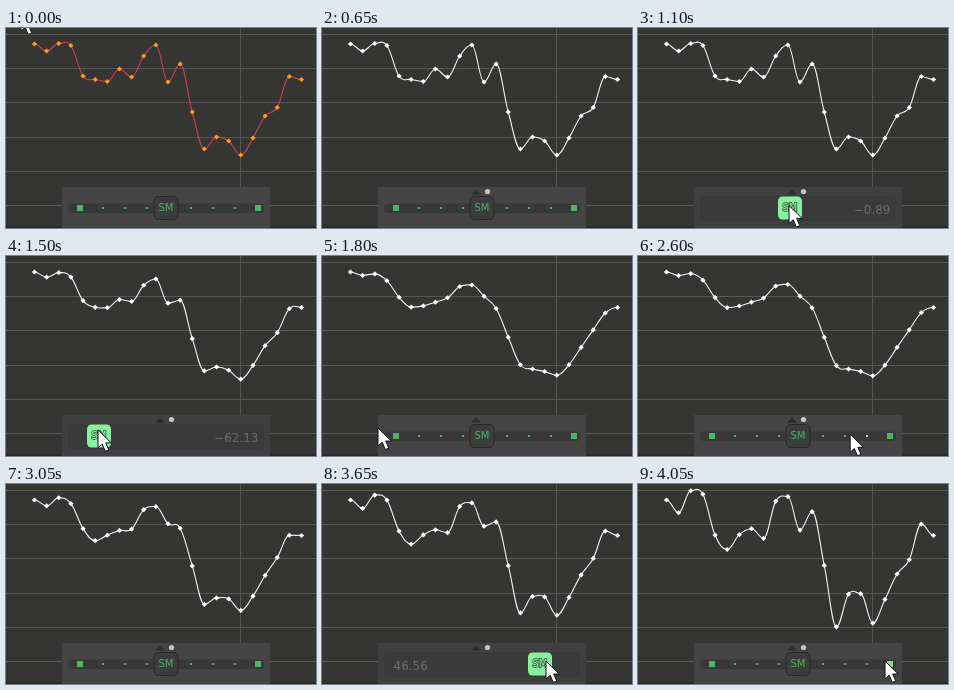
An HTML page that plays this animation: 310 px wide and 200 px high, repeating every 4.2 s.

```html
<!DOCTYPE html>
<html lang="en">
<head>
<meta charset="utf-8">
<title>Curve smoothing slider</title>
<style>
html, body { margin: 0; width: 100%; height: 100%; overflow: hidden; background: #353533; }
svg { display: block; width: 100vw; height: 100vh; }
text { font-family: "DejaVu Sans", sans-serif; }
</style>
</head>
<body>
<svg viewBox="0 0 310 200">
  <rect width="310" height="200" fill="#353533"/>
  <path d="M0 6.5H310M0 40.5H310M0 74.5H310M0 109.5H310M0 143.5H310M0 177.5H310M234.5 0V200" stroke="#565654" fill="none"/>
  <rect y="198" width="310" height="2" fill="#2d292b"/>
  <path id="curve" fill="none" stroke-width="1.1"/>
  <path id="points"/>
  <rect id="panel" x="56" y="159" width="208" height="41"/>
  <path id="caret" d="M149 166.5L154 161.5L159 166.5Z" fill="#2c2c2c"/>
  <circle id="dot" cx="165.5" cy="163.5" r="2.6" fill="#c9c4c4"/>
  <g id="presets">
    <rect x="62" y="175.5" width="196" height="9.5" rx="4" fill="#393939"/>
  </g>
  <g id="slider">
    <rect x="62" y="168" width="196" height="25" rx="4" fill="#3a3a3a"/>
    <text id="value" y="186" font-size="12" fill="#6c6c6c"></text>
  </g>
  <g id="handle">
    <rect id="knob" x="-12" y="168.5" width="24" height="23" rx="4.5"/>
    <text id="label" y="183.3" font-size="10" text-anchor="middle" paint-order="stroke">SM</text>
  </g>
  <path id="cursor" d="M0 0V18L4.2 14.2L7.3 21.5L10.8 20L7.7 13H13.2Z" fill="#fff" stroke="#111"/>
</svg>
<script>
const LOOP = 4200, STEP = 50, REACH = 85;
const $ = id => document.getElementById(id);
const set = (el, attrs) => { for (const k in attrs) el.setAttribute(k, attrs[k]); };
const show = (el, on) => set(el, { visibility: on ? "visible" : "hidden" });
const clamp = (v, lo, hi) => Math.min(hi, Math.max(lo, v));

// positive k pulls each point to the mean of its neighbours, negative k pushes it away
const relax = (ys, k) => ys.map((y, i) =>
  i && i < ys.length - 1 ? y + k * ((ys[i - 1] + ys[i + 1]) / 2 - y) : y);

const raw = [16, 23, 15.5, 17.5, 48, 51.5, 53.5, 41, 49, 28, 17, 54, 36, 84, 121, 109, 113, 127, 110, 88, 79.5, 48.5, 51.5];
const smooth = relax(raw, 0.5);
const mid = relax(smooth, -1);
const GAP = 267 / (raw.length - 1);

// cursor visits as [time, x, y]
const moves = [
  [[0, 15, -15], [350, 312, 138]],
  [[650, 190, 202], [1050, 158.4, 178], [1700, 62.5, 172], [1800, 56, 172],
   [1950, 57, 173], [2150, 127, 179], [2800, 250, 178], [2900, 262, 204]],
  [[3050, 190, 202], [3300, 166, 178], [3650, 224, 177], [3790, 247, 177], [LOOP, 247, 177]]
];
const drags = [
  { from: 1050, to: 1700, grab: 159, gain: 0.5 },
  { from: 3300, to: 4000, grab: 166, gain: 1.1 }
];

function cursorAt(t) {
  for (const path of moves)
    for (let i = 1; i < path.length; i++) {
      const [t0, x0, y0] = path[i - 1], [t1, x1, y1] = path[i];
      if (t < t0 || t > t1) continue;
      const k = (t - t0) / (t1 - t0);
      return [x0 + (x1 - x0) * k, y0 + (y1 - y0) * k];
    }
  return null;
}

const strength = d => (d / REACH) ** 2;

function offset(drag, t) {
  const [x] = cursorAt(clamp(t, drag.from, drag.to));
  return clamp(Math.round(x - drag.grab), -REACH, REACH);
}

// the curve follows the handle one step late
const effect = (drag, t) => drag.gain * strength(offset(drag, t - STEP));

function heights(t) {
  if (t < 2500) return relax(raw, effect(drags[0], t));
  if (t < 3300) return relax(smooth, -(clamp((t - 2500) / 350, 0, 1) ** 2));
  return relax(mid, -effect(drags[1], t));
}

// level at peaks and valleys, otherwise parallel to the neighbours
function slope(ys, i) {
  const a = ys[i] - ys[i - 1], b = ys[i + 1] - ys[i];
  return a * b > 0 ? (a + b) / 2 : 0;
}

function drawCurve(ys, chosen) {
  const reach = 0.38, h = GAP * reach;
  let line = "", marks = "";
  ys.forEach((y, i) => {
    const x = 28.5 + i * GAP;
    line += i
      ? `C${x - GAP + h} ${ys[i - 1] + slope(ys, i - 1) * reach} ${x - h} ${y - slope(ys, i) * reach} ${x} ${y}`
      : `M${x} ${y}`;
    marks += `M${x - 2.6} ${y}l2.6-2.6l2.6 2.6l-2.6 2.6Z`;
  });
  set($("curve"), { d: line, stroke: chosen ? "#f2f2f2" : "#d23c5a" });
  set($("points"), { d: marks, fill: chosen ? "#fff" : "#ff9a1a" });
}

const stops = [];
for (let n = -4; n <= 4; n++) {
  if (!n) continue;
  const x = 163 + Math.sign(n) * Math.round(Math.abs(n) * 22.25 - 0.5);
  const r = Math.abs(n) === 4 ? 3 : 1;
  const el = document.createElementNS("http://www.w3.org/2000/svg", "rect");
  set(el, { x: x - r, y: 180 - r, width: 2 * r, height: 2 * r });
  $("presets").append(el);
  stops.push({ x, r, el });
}

function draw(t) {
  const tip = cursorAt(t) || [-50, -50];
  const drag = drags.find(g => t >= g.from && t < g.to);
  const d = drag ? offset(drag, t) : 0;
  const chosen = t >= 300;

  drawCurve(heights(t), chosen);
  set($("cursor"), { transform: `translate(${tip})` });
  show($("caret"), chosen);
  show($("dot"), chosen && !(t >= 1700 && t < 2500));
  set($("panel"), { fill: drag ? "#404040" : "#454545" });

  show($("presets"), !drag);
  show($("slider"), drag);
  for (const s of stops) {
    const lit = tip[1] > 165 && tip[1] < 186 && Math.abs(tip[0] + 6 - s.x) < 11;
    set(s.el, { fill: lit ? (s.r > 1 ? "#7ee596" : "#c4d9b4") : "#4bb565" });
  }

  const v = (100 * strength(d)).toFixed(2);
  $("value").textContent = d ? (d < 0 ? "\u2212" + v : v) : "";
  set($("value"), d < 0 ? { x: 252.5, "text-anchor": "end" } : { x: 71.5, "text-anchor": "start" });

  set($("handle"), { transform: `translate(${160 + d} 0)` });
  set($("knob"), drag ? { fill: "#86f29d", stroke: "none" } : { fill: "#3d3d3d", stroke: "#272727" });
  set($("label"), drag
    ? { fill: "#86f29d", stroke: "#456b4e", "stroke-width": 1.8 }
    : { fill: "#48b363", stroke: "none" });
}

const start = performance.now();
function tick() {
  const t = (performance.now() - start) % LOOP;
  draw(Math.floor(t / STEP) * STEP);
  requestAnimationFrame(tick);
}
tick();
</script>
</body>
</html>
```
